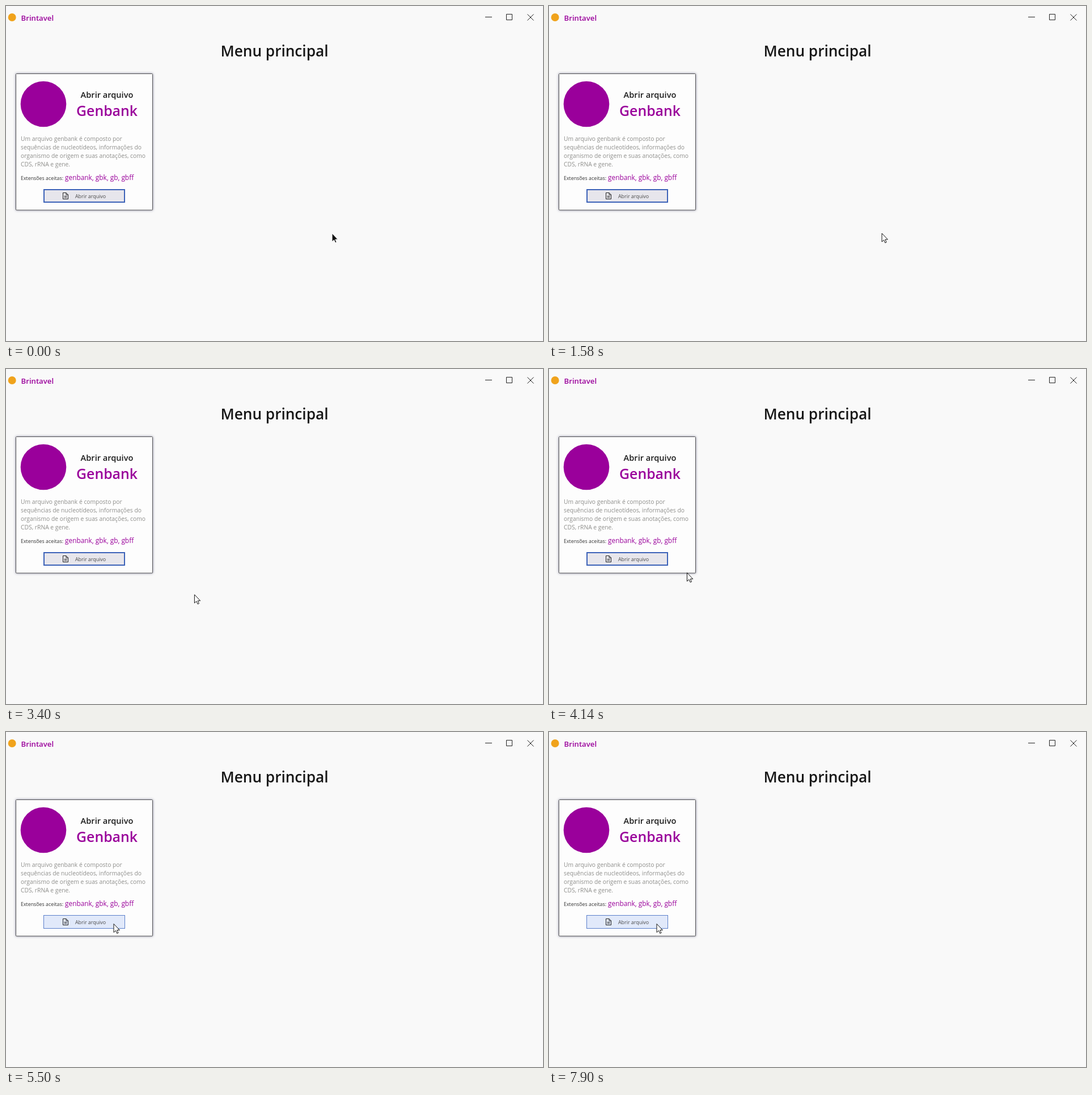
Recreate the animation shown at these times as an HTML page. Size 947x591 px, loop 8000 ms.

```html
<!DOCTYPE html>
<html lang="pt">
<head>
<meta charset="utf-8">
<title>Menu principal</title>
<style>
  html, body { margin: 0; width: 100%; height: 100%; overflow: hidden; background: #f9f9f9; }
  svg { display: block; font-family: "Open Sans", "Noto Sans", sans-serif; }
  .semi { font-weight: 600; }
  .purple { fill: #9a009b; }
  .line { fill: none; stroke: #222; }
  .description { font-size: 10.3px; fill: #8e8e8b; }
  .card { fill: #fdfdfd; stroke: #505052; filter: drop-shadow(0 0 2px #555577aa); }
</style>
</head>
<body>
<svg width="947" height="591" viewBox="0 0 947 591">
  <rect width="947" height="591" fill="#f9f9f9"/>

  <!-- Title bar -->
  <circle cx="10.7" cy="20" r="7" fill="#f0a31c"/>
  <text x="26.5" y="25.5" font-size="13.2" class="semi purple">Brintavel</text>
  <path class="line" d="M845 19.5H857M882.5 14.5H892.5V24.5H882.5ZM919.5 14.5L930.5 25.5M930.5 14.5L919.5 25.5"/>

  <text x="473.5" y="89" font-size="26.2" text-anchor="middle" class="semi" fill="#161616">Menu principal</text>

  <!-- File card -->
  <rect class="card" x="17.5" y="119.5" width="241" height="240.5" rx="1"/>
  <circle cx="66" cy="173" r="40.3" class="purple"/>
  <text x="178" y="162" font-size="14.6" text-anchor="middle" class="semi" fill="#1c1c1c">Abrir arquivo</text>
  <text x="178" y="194" font-size="24.8" text-anchor="middle" class="semi purple">Genbank</text>
  <g class="description">
    <text x="26" y="238">Um arquivo genbank é composto por</text>
    <text x="26" y="253">sequências de nucleotídeos, informações do</text>
    <text x="26" y="268">organismo de origem e suas anotações, como</text>
    <text x="26" y="283">CDS, rRNA e gene.</text>
  </g>
  <text x="26" y="306.5" font-size="8.85" fill="#333">Extensões aceitas:</text>
  <text x="104" y="306.5" font-size="11.85" class="purple">genbank, gbk, gb, gbff</text>

  <!-- Button: focused state with the hover state fading in over it -->
  <rect x="67" y="324" width="142" height="22" fill="#e7e6ec" stroke="#3c62b8" stroke-width="2"/>
  <g id="hover">
    <rect x="65.5" y="322.5" width="145" height="25" fill="#fdfdfd"/>
    <rect x="66.5" y="323.5" width="143" height="23" fill="#e1e9fa" stroke="#5b80cb"/>
  </g>
  <path class="line" d="M100.5 329.5H106L109.5 333V340.5H100.5ZM106 329.5V333H109.5M102.5 335.5H107.5M102.5 337.8H107.5"/>
  <text x="122" y="339" font-size="8.9" fill="#4a4a4a">Abrir arquivo</text>

  <path id="cursor" stroke-linejoin="round"
    d="M.5 .5V15.5L4 12.3 6.2 17.3 8.5 16.3 6.3 11.4H10.8Z"/>
</svg>
<script>
const LOOP = 8000;
const cursor = document.getElementById("cursor");
const hover = document.getElementById("hover");

// Pointer tip: time, x, y
const path = [
  [0, 574.5, 400.5], [20, 574.5, 400.5], [900, 588, 401], [2320, 585, 400],
  [2600, 585, 400], [3300, 344, 399], [3400, 332, 397.5],
  [4140, 243, 359], [4940, 191, 344], [5060, 189.5, 338], [LOOP, 189.5, 338]
];

const progress = (t, start, end) => Math.min(1, Math.max(0, (t - start) / (end - start)));

function pointerAt(t) {
  const next = path.findIndex(point => point[0] > t);
  const [t0, x0, y0] = path[next - 1];
  const [t1, x1, y1] = path[next];
  const k = progress(t, t0, t1);
  return [x0 + (x1 - x0) * k, y0 + (y1 - y0) * k];
}

function draw(now) {
  const t = now % LOOP;
  const dark = t < 20;
  cursor.setAttribute("transform", `translate(${pointerAt(t)})`);
  cursor.setAttribute("fill", dark ? "#111" : "#fff");
  cursor.setAttribute("stroke", dark ? "#fff" : "#111");
  cursor.setAttribute("visibility", dark || t >= 900 ? "visible" : "hidden");
  hover.setAttribute("opacity", progress(t, 4940, 5100));
}

const start = performance.now();
function tick() {
  draw(performance.now() - start);
  requestAnimationFrame(tick);
}
tick();
</script>
</body>
</html>
```
